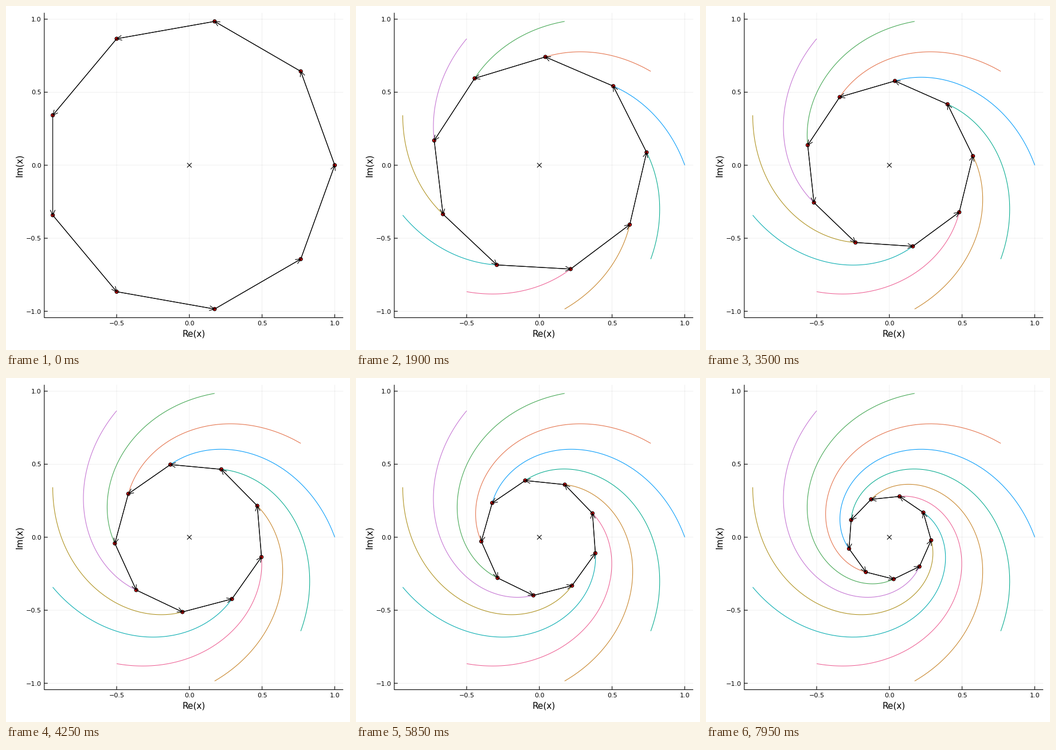
Recreate the animation shown at these times as a matplotlib script. Size 600x600 px, loop 8 s.

```python
import numpy as np
import matplotlib.pyplot as plt
from matplotlib.animation import FuncAnimation
from matplotlib.patches import Circle

SIZE, DPI = 600, 100
FRAMES, INTERVAL = 160, 50
N = 9
DT = 10 / 299                      # time step of the pursuit
PX = 72 / DPI                      # points per pixel
LW = 1.1 * PX
COLORS = ["#009AFA", "#E36F47", "#3EA44E", "#C371D2", "#AC8E18",
          "#00AAAE", "#ED5E93", "#C68225", "#00A98D"]

# plot area in pixels, y pointing down
LEFT, RIGHT, TOP, BOTTOM = 66.75, 588.19, 11.81, 543.6

start = np.exp(2j * np.pi * np.arange(N) / N)
rate = np.exp(2j * np.pi / N) - 1


def limits(v):
    pad = 0.03 * (v.max() - v.min())
    return v.min() - pad, v.max() + pad


X_LO, X_HI = limits(start.real)
Y_LO, Y_HI = limits(start.imag)


def to_px(z):
    """Complex plane to pixel position, kept as a complex number."""
    z = np.asarray(z, dtype=complex)
    x = LEFT + (z.real - X_LO) / (X_HI - X_LO) * (RIGHT - LEFT)
    y = BOTTOM - (z.imag - Y_LO) / (Y_HI - Y_LO) * (BOTTOM - TOP)
    return x + 1j * y


fig = plt.figure(figsize=(SIZE / DPI, SIZE / DPI), dpi=DPI, facecolor="white")
ax = fig.add_axes([0, 0, 1, 1])
ax.set_xlim(0, SIZE)
ax.set_ylim(SIZE, 0)
ax.axis("off")


def line(x, y, color="black", lw=LW, **kw):
    item, = ax.plot(x, y, color=color, lw=lw, solid_capstyle="butt", **kw)
    item.set_snap(False)
    return item


def label(x, y, text, size, ha="center", **kw):
    ax.text(x, y, text, fontsize=size, family="DejaVu Sans", ha=ha,
            va="baseline", rotation_mode="anchor", **kw)


def tick_text(v):
    return f"{v:.1f}".replace("-", "\u2212")


def draw_axes():
    for v in (-0.5, 0.0, 0.5, 1.0):
        x = to_px(v).real
        line([x, x], [TOP, BOTTOM], lw=0.6 * PX, alpha=0.1, zorder=0)
        line([x, x], [BOTTOM, BOTTOM - 6], zorder=1)
        label(x, 556.7, tick_text(v), 8)
    for v in (-1.0, -0.5, 0.0, 0.5, 1.0):
        y = to_px(1j * v).imag
        line([LEFT, RIGHT], [y, y], lw=0.6 * PX, alpha=0.1, zorder=0)
        line([LEFT, LEFT + 6], [y, y], zorder=1)
        label(61.8, y + 4.1, tick_text(v), 8, ha="right")
    line([LEFT, LEFT, RIGHT], [TOP, BOTTOM, BOTTOM], zorder=1)
    label((LEFT + RIGHT) / 2, 576.8, "Re(x)", 11)
    label(28, (TOP + BOTTOM) / 2, "Im(x)", 11, rotation=90)


def draw_cross(r=3.9):
    c = to_px(0)
    for s in (1, -1):
        line([c.real - r, c.real + r], [c.imag - s * r, c.imag + s * r],
             zorder=5)


draw_axes()
draw_cross()
trails = [line([], [], color=c, lw=1.05 * PX, zorder=2) for c in COLORS]
dots = [Circle((0, 0), 3.05, fc="red", ec="black", lw=LW, zorder=3)
        for _ in range(N)]
for dot in dots:
    ax.add_patch(dot)
# the shafts are stroked twice, once alone and once with the heads
shafts = line([], [], zorder=4)
arrows = line([], [], zorder=4)


def polyline(parts):
    """Join complex paths with gaps between them."""
    z = np.concatenate([np.append(p, complex(np.nan, np.nan)) for p in parts])
    return z.real, z.imag


def head(tail, tip):
    back = (tail - tip) / abs(tail - tip)
    return [tip + back * (9 + 4.2j), tip, tip + back * (9 - 4.2j)]


def update(k):
    path = np.exp(rate * DT * np.arange(k + 1))
    for z0, trail in zip(start, trails):
        p = to_px(z0 * path)
        trail.set_data(p.real, p.imag)

    pos = to_px(start * path[-1])
    for p, dot in zip(pos, dots):
        dot.center = (p.real, p.imag)

    edges = list(zip(pos, np.roll(pos, -1)))
    shafts.set_data(*polyline(edges))
    arrows.set_data(*polyline(edges + [head(a, b) for a, b in edges]))
    return [*trails, *dots, shafts, arrows]


anim = FuncAnimation(fig, update, frames=FRAMES, interval=INTERVAL,
                     repeat=True, repeat_delay=0, blit=False)
plt.show()
```
